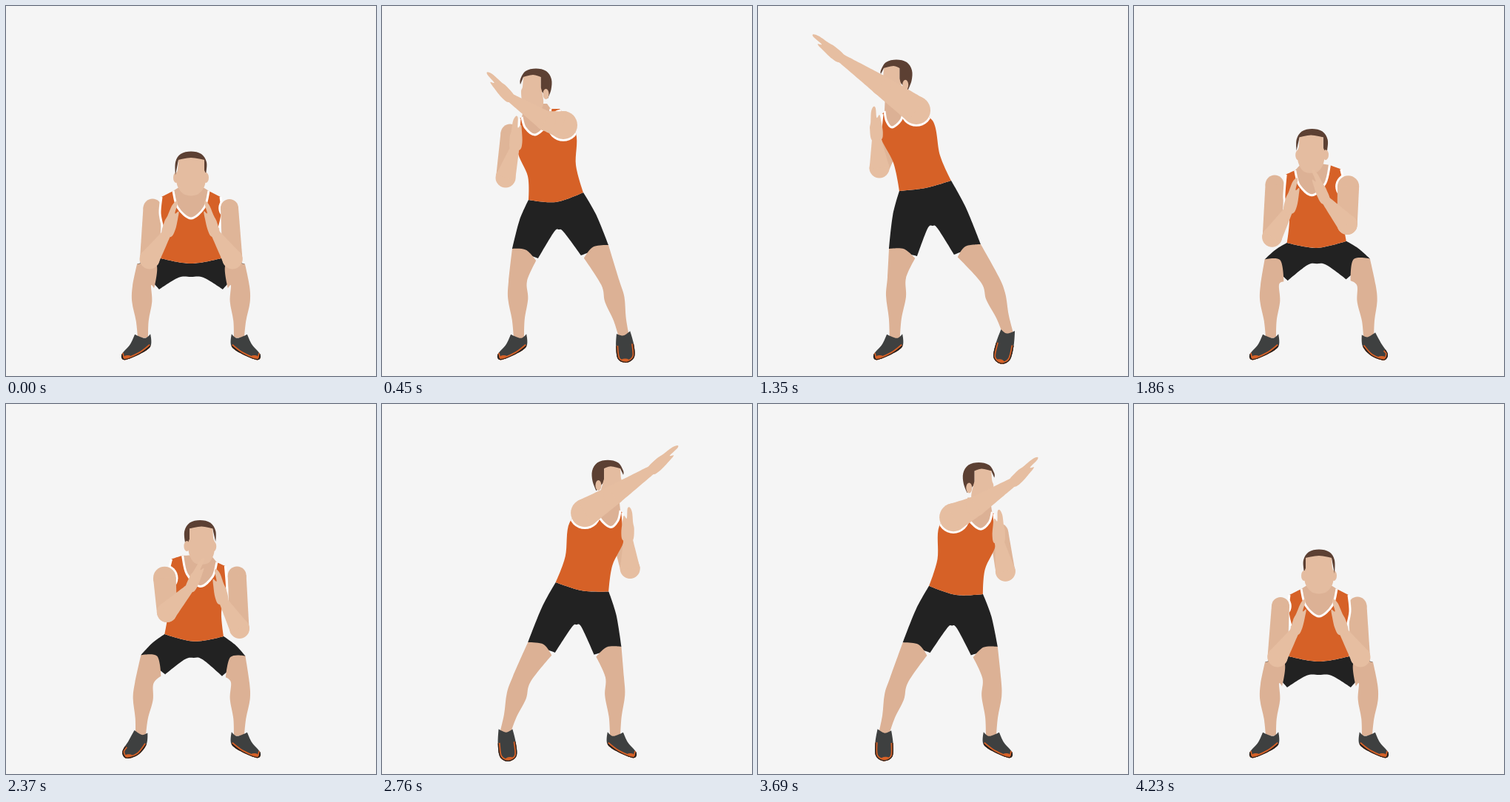
Recreate the animation shown at these times as an HTML page with a canvas. Size 500 px wide and 500 px high, loop 4.38 s.

```html
<!DOCTYPE html>
<html lang="en">
<head>
<meta charset="utf-8">
<title>Squat with cross punch</title>
<style>
html, body { margin: 0; width: 100%; height: 100%; overflow: hidden; background: #f5f5f5; }
canvas { display: block; width: 100%; height: 100%; }
</style>
</head>
<body>
<canvas id="stage" width="500" height="500"></canvas>
<script>
const ctx = document.getElementById('stage').getContext('2d');
const HALF = 2190, STEP = 30, MOVE = 960;
const SKIN = '#e6bea1', FACE = '#e4bca0', SHADE = '#dcb195', TANK = '#d66127';
const BLACK = '#222222', SHOE = '#3e4040', HAIR = '#5c4033', WHITE = '#ffffff';

// Joints at three poses: squat, strike, stretch. A fourth, full reach, is extrapolated.
const KEYS = [0, .5, .719, 1];
const REACH = .45;
const joints = {};

function joint(name, squat, strike, stretch) {
  joints[name] = [squat, strike, stretch, stretch.map((v, i) => v + REACH * (v - strike[i]))];
}

// The squat is symmetric, so the right joint starts as a mirror of the left one.
function pair(name, squat, strikeL, stretchL, strikeR, stretchR) {
  joint(name + 'L', squat, strikeL, stretchL);
  joint(name + 'R', [500 - squat[0], squat[1]], strikeR, stretchR);
}

joint('head', [250, 196], [208, 84], [187, 72]);
joint('turn', [0], [1], [1.2]);
joint('collar', [250, 287], [207, 174], [181, 164]);
joint('belt', [250, 348], [235, 265], [226, 246]);
joint('crotch', [250, 366], [239, 302], [236, 297]);

pair('neck', [226, 250], [189, 150], [171, 142], [228, 139], [197, 140]);
pair('strap', [210, 258], [186, 152], [168, 146], [240, 139], [205, 140]);
pair('pit', [208, 280], [183, 195], [165, 175], [262, 172], [236, 155]);
pair('side', [213, 305], [197, 230], [183, 212], [262, 215], [246, 202]);
pair('waist', [209, 341], [198, 262], [191, 250], [272, 252], [261, 236]);
pair('hem', [177, 349], [176, 328], [177, 328], [306, 323], [301, 322]);
pair('cuff', [207, 383], [211, 341], [215, 338], [269, 337], [265, 336]);
pair('knee', [184, 378], [184, 372], [188, 367], [308, 374], [313, 370]);
pair('ankle', [185, 444], [185, 444], [185, 444], [326, 443], [337, 440]);
pair('toe', [158, 478], [158, 478], [158, 478], [329, 482], [326, 483]);
pair('shoulder', [198, 273], [173, 172], [181, 182], [245, 161], [214, 141]);
pair('elbow', [194, 342], [167, 232], [164, 219], [221, 155], [166, 107]);
pair('wrist', [218, 306], [180, 190], [160, 177], [172, 123], [110, 69]);
pair('tip', [231, 264], [182, 149], [157, 136], [142, 90], [74, 39]);

// Local outlines along a bone: [fraction of its length, offset to the side].
const SHIN = [[0, 12], [.33, 13], [.72, 8], [1.07, 7], [1.07, -7], [.72, -9], [.33, -14], [0, -13]];
const HAND = [[-.1, 5.5], [.28, 7], [.5, 5.5], [.84, 4], [1, 1], [.95, -1.5], [.63, -2], [.72, -5.5], [.5, -7], [.14, -8], [-.1, -5.5]];
const SHOE_SIDE = [[-.16, 7.4], [.05, 5], [.15, -8.8], [.5, -5.2], [.9, -5.6], [.97, 2], [.53, 13.2], [.13, 17.8]];
const SHOE_FRONT = [[-.02, 9], [.06, 0], [-.08, -9.5], [.37, -13], [.82, -12.6], [1, -2], [.86, 9.6], [.4, 11]];

const lerp = (a, b, t) => a.map((v, i) => v + (b[i] - v) * t);
const toward = (a, b) => {
  const len = Math.hypot(b[0] - a[0], b[1] - a[1]) || 1;
  return [(b[0] - a[0]) / len, (b[1] - a[1]) / len];
};
const place = (a, b, outline, flip) => {
  const [dx, dy] = toward(a, b);
  return outline.map(([t, w]) => {
    const [x, y] = lerp(a, b, t);
    return [x - dy * w * flip, y + dx * w * flip];
  });
};

// Monotone cubic through the poses, at rest at both ends.
function at(keys, s) {
  const last = KEYS.length - 1;
  let k = 0;
  while (k < last - 1 && s > KEYS[k + 1]) k++;
  const h = KEYS[k + 1] - KEYS[k], t = (s - KEYS[k]) / h;
  const secant = (j, i) => (keys[j + 1][i] - keys[j][i]) / (KEYS[j + 1] - KEYS[j]);
  const slope = (j, i) => {
    if (j === 0 || j === last) return 0;
    const a = secant(j - 1, i), b = secant(j, i);
    return a * b > 0 ? Math.sign(a) * Math.sqrt(a * b) : 0;
  };
  const q = t * t * (3 - 2 * t);
  return keys[k].map((v, i) => v + (keys[k + 1][i] - v) * q +
    h * t * (1 - t) * ((1 - t) * slope(k, i) - t * slope(k + 1, i)));
}

// Smooth path through points; indices in corners stay sharp.
function trace(p, corners = [], closed = true) {
  const n = p.length;
  const pt = i => p[closed ? (i + n) % n : Math.max(0, Math.min(n - 1, i))];
  const handle = (i, dir) => {
    const [x, y] = pt(i), a = pt(i - 1), b = pt(i + 1);
    if (corners.includes(i % n)) return [x, y];
    return [x + dir * (b[0] - a[0]) / 6, y + dir * (b[1] - a[1]) / 6];
  };
  ctx.beginPath();
  ctx.moveTo(...p[0]);
  for (let i = 0; i < (closed ? n : n - 1); i++) {
    ctx.bezierCurveTo(...handle(i, 1), ...handle(i + 1, -1), ...pt(i + 1));
  }
  if (closed) ctx.closePath();
}

function shape(p, color, corners) {
  trace(p, corners);
  ctx.fillStyle = color;
  ctx.fill();
}

function line(p, color, width) {
  trace(p, [], false);
  ctx.strokeStyle = color;
  ctx.lineWidth = width;
  ctx.stroke();
}

function oval([x, y], rx, ry, color) {
  ctx.beginPath();
  ctx.ellipse(x, y, rx, ry, 0, 0, 2 * Math.PI);
  ctx.fillStyle = color;
  ctx.fill();
}

// Two discs joined by straight sides.
function taper(a, b, ra, rb, color) {
  oval(a, ra, ra, color);
  oval(b, rb, rb, color);
  shape(place(a, b, [[0, ra], [1, rb], [1, -rb], [0, -ra]], 1), color, [0, 1, 2, 3]);
}

function drawShorts(j, fold) {
  const [x, y] = j.crotch, w = 7 + 10 * fold, drop = 4 - 3 * fold;
  const hip = (k, out) => {
    const [hx, hy] = lerp(j['waist' + k], j['hem' + k], .42);
    return [hx + out, hy];
  };
  shape([j.waistL, j.belt, j.waistR, hip('R', 3), j.hemR, j.cuffR, [x + w, y + drop], [x, y],
    [x - w, y + drop], j.cuffL, j.hemL, hip('L', -3)], BLACK, [0, 2, 4, 5, 9, 10]);
}

function drawLeg(hem, cuff, knee, ankle, flip, fold) {
  const mid = lerp(hem, cuff, .5);
  const [ux, uy] = toward(knee, mid);
  const cap = 5 + 15 * fold;
  shape([hem, [mid[0] + ux * cap, mid[1] + uy * cap], lerp(cuff, knee, .1 + .2 * fold),
    ...place(knee, ankle, SHIN, flip)], SHADE, [0, 2, 6, 7]);
}

function drawShoe(ankle, toe, flip, turn) {
  const outline = SHOE_SIDE.map((p, i) => lerp(p, SHOE_FRONT[i], turn));
  const p = place(ankle, toe, outline, flip);
  const sole = [lerp(p[4], p[3], turn), ...p.slice(4)];
  ctx.save();
  shape(p, SHOE, [0, 2]);
  ctx.clip();
  oval(lerp(p[5], p[6], .2), 7, 4.5, TANK);
  line(sole, TANK, 6);
  line(sole, BLACK, 2.4);
  ctx.restore();
}

function drawTorso(j, fold, radius) {
  const p = [j.strapL, j.neckL, j.neckR, j.strapR, j.pitR, j.sideR, j.waistR, j.belt, j.waistL, j.sideL, j.pitL];
  shape(p, TANK, [0, 1, 2, 3, 6, 8]);
  ctx.save();
  ctx.clip();
  oval(j.shoulderR, radius + 2.8, radius + 2.8, WHITE);
  ctx.restore();
  for (const k of ['L', 'R']) {
    if (k === 'R' && fold === 0) continue;
    line([j['strap' + k], j['pit' + k], lerp(j['pit' + k], j['side' + k], .8 * fold)], WHITE, 3);
  }
}

function drawNeck(j) {
  const bend = a => [a[0] * .75 + j.collar[0] * .25, a[1] * .4 + j.collar[1] * .6];
  const curve = [j.neckL, bend(j.neckL), j.collar, bend(j.neckR), j.neckR];
  const [x, y] = j.head;
  shape([...curve, [x + 15, y + 48], [x - 15, y + 48]], SHADE, [0, 4, 5, 6]);
  line(curve, WHITE, 3);
}

function drawHead([x, y], q) {
  const e = 18 - 11.5 * q, jaw = Math.max(e, 10), mid = (jaw - 18) / 2;
  ctx.save();
  ctx.translate(x, y);
  oval([6 * q - 20, 36], 4, 7, FACE);
  shape([[-21, 33 - 11 * q], [-21, 15], [-14, 4], [0, .5], [14, 4], [21, 15], [20.5, 29],
    [20 - 4 * q, 33 + 8 * q], [e, 30], [e, 12], [-17, 12]], HAIR, [0, 7, 8, 9, 10]);
  shape([[-17, 12], [mid, 9], [e, 12], [e, 26], [e + 2, 33], [jaw, 48], [mid + 8, 59],
    [mid - 8, 59], [-18, 48], [-20, 32], [-18, 25]], FACE, [0, 2, 3]);
  oval([20 - 6.5 * q, 36 - q], 4, 7, FACE);
  ctx.restore();
}

function drawForearm(j, k, flip) {
  taper(j['elbow' + k], j['wrist' + k], 13.5, 5.8, SKIN);
  shape(place(j['wrist' + k], j['tip' + k], HAND, flip), SKIN);
}

function figure(s) {
  const j = {};
  for (const name in joints) j[name] = at(joints[name], s);
  const x = Math.min(1, s / .45), rise = x * x * (3 - 2 * x), fold = 1 - rise;
  const radius = 12 + 7 * rise;

  drawShorts(j, fold);
  for (const [k, flip, turn] of [['L', -1, 0], ['R', 1, rise]]) {
    drawLeg(j['hem' + k], j['cuff' + k], j['knee' + k], j['ankle' + k], flip, fold);
    drawShoe(j['ankle' + k], j['toe' + k], flip, turn);
  }
  taper(j.shoulderL, j.elbowL, 12.5, 13, '#dfb598');
  drawTorso(j, fold, radius);
  drawNeck(j);
  drawHead(j.head, j.turn[0]);
  drawForearm(j, 'L', -1.15);
  const tone = lerp([223, 181, 152], [230, 190, 161], rise).map(Math.round);
  taper(j.shoulderR, j.elbowR, radius, 13.5, `rgb(${tone})`);
  drawForearm(j, 'R', 1);
}

function progress(u) {
  if (u >= 2160) return (u - 2160) / MOVE;
  if (u <= 930) return (u + 30) / MOVE;
  return Math.max(0, Math.min(1, 1 - (u - 1080) / MOVE));
}

function draw(ms) {
  const t = Math.floor(ms / STEP) * STEP % (2 * HALF);
  ctx.setTransform(1, 0, 0, 1, 0, 0);
  ctx.fillStyle = '#f5f5f5';
  ctx.fillRect(0, 0, 500, 500);
  if (t >= HALF) ctx.setTransform(-1, 0, 0, 1, 500, 0);
  // The loop closes on a still squat.
  figure(t >= 4230 || t === 0 ? 0 : progress(t % HALF));
}

const start = performance.now();
function tick() {
  draw(performance.now() - start);
  requestAnimationFrame(tick);
}
tick();
</script>
</body>
</html>
```
